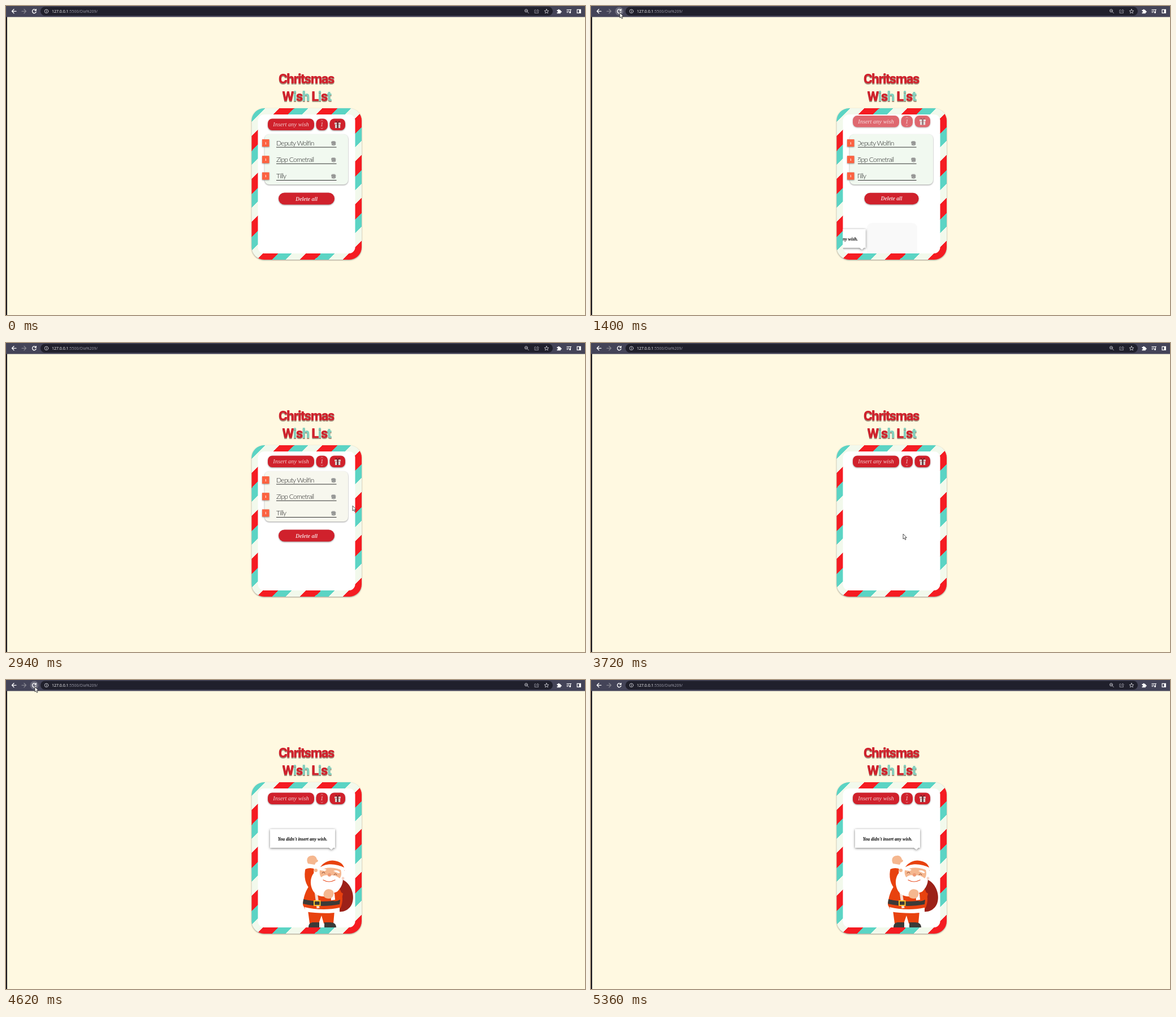
An HTML page for the animation above (5380 ms loop, 1024x547 px).

```html
<!DOCTYPE html>
<html lang="en">
<head>
<meta charset="utf-8">
<title>Wish list</title>
<style>
html, body { margin: 0; width: 100%; height: 100%; overflow: hidden; background: #fff9e1; }
svg { display: block; width: 1024px; height: 547px; }
.sh { filter: drop-shadow(0 1px 1px #0006); }
.url { font: 7px "Open Sans", sans-serif; fill: #9a9aa6; }
.title { font: 900 24px Roboto, sans-serif; letter-spacing: -1.5px; text-anchor: middle; fill: #d0212c; filter: drop-shadow(0 2px .5px #6b4a3a99); }
.title .alt { fill: #83d0be; }
.script { font: italic 10.4px "Liberation Serif", serif; text-anchor: middle; fill: #f3ced0; }
.bold { font-weight: 700; font-size: 10px; }
.wish { font: 300 12px Lato, sans-serif; letter-spacing: -.7px; fill: #222; }
.qty { font: 700 6px "Liberation Serif", serif; text-anchor: middle; fill: #fff; }
.red { fill: #d0212c; }
.coat { fill: #e8420f; }
.fur { fill: #fff; }
.skin { fill: #f5b78f; }
.dark { fill: #3b3a38; }
.line { fill: none; stroke-linecap: round; stroke-linejoin: round; }

/* every animation shares one clock */
.form, .slide, .pop, .bubble, .list, .panel, .remove, .note, .santa, .slot, .halo, .mouse, .arrow, .hand {
  animation: 5380ms linear infinite;
}
.list, .remove, .note, .slot, .halo, .arrow, .hand { animation-timing-function: step-end; }
.form { --y: -17px; --fade: 0; animation-name: enter; }
.slide { --x: -28px; animation-name: enter; }
.pop { --size: .91; transform-box: fill-box; transform-origin: center; animation-name: enter; }
.bubble { animation-name: bubble; }
.list { animation-name: list; }
.panel { animation-name: panel; animation-timing-function: step-end; }
.remove { animation-name: remove; }
.note { animation-name: note; }
.santa { animation-name: santa; }
.slot { animation-name: slot; }
.halo { animation-name: halo; }
.mouse { animation-name: mouse; }
.arrow { animation-name: arrow; }
.hand { animation-name: hand; }

@keyframes enter {
  0%, 21.18%, 32.34%, 43.48%, 54.65%, 87.35%, 98.51%, 100% { opacity: 1; transform: none; }
  21.19%, 43.49%, 87.36% {
    opacity: var(--fade, 1);
    transform: translate(var(--x, 0px), var(--y, 0px)) scale(var(--size, 1));
    animation-timing-function: cubic-bezier(.5, 1, .89, 1);
  }
}
@keyframes bubble {
  0%, 21.18%, 32.34%, 43.48%, 54.65%, 67.46%, 78.63%, 87.35%, 98.51%, 100% { transform: none; }
  21.19%, 43.49%, 67.47%, 87.36% {
    transform: translateX(-300px);
    animation-timing-function: cubic-bezier(.5, 1, .89, 1);
  }
}
@keyframes list {
  0%, 44.61% { visibility: visible; }
  43.49%, 67.29%, 100% { visibility: hidden; }
}
@keyframes panel {
  0% { fill: #f1f9f0; }
  44.61%, 100% { fill: #f7f7ee; }
}
@keyframes remove {
  0%, 44.61% { visibility: visible; translate: 0 0; }
  43.49%, 67.29% { visibility: hidden; translate: 0 0; }
  88.2% { visibility: visible; translate: 0 -95.5px; }
  91.27%, 100% { visibility: hidden; translate: 0 -95.5px; }
}
@keyframes note {
  0%, 27.7%, 50% { visibility: hidden; translate: 0 131px; }
  21.19%, 43.49% { visibility: visible; translate: 0 131px; }
  67.47%, 91.27%, 100% { visibility: visible; translate: 0 0; }
  87.36% { visibility: visible; translate: 0 36px; }
}
@keyframes santa {
  0%, 70.9%, 87.36%, 91.26% { transform: translateY(130px); }
  70.91%, 91.27% { transform: translateY(130px); animation-timing-function: cubic-bezier(.5, 1, .89, 1); }
  79.09%, 87.35%, 99.44%, 100% { transform: none; }
}
@keyframes slot {
  0%, 54.65%, 100% { visibility: hidden; }
  22.3% { visibility: visible; }
}
@keyframes halo {
  0%, 46.84%, 91.45%, 100% { visibility: hidden; }
  13.01%, 83.27% { visibility: visible; }
}
@keyframes mouse {
  0%, 1.86% { transform: translate(1030px, 139px); }
  11.52% { transform: translate(112px, 18px); }
  13.01%, 46.84% { transform: translate(51px, 12px); }
  53.16% { transform: translate(604px, 283px); }
  54.65% { transform: translate(613px, 288px); }
  58.5% { transform: translate(614px, 306px); }
  63.2% { transform: translate(563px, 322px); }
  65%, 72.5% { transform: translate(552px, 338px); }
  76.58% { transform: translate(554px, 266px); }
  83.27% { transform: translate(60px, 19px); }
  84%, 88.48% { transform: translate(51px, 12px); }
  91.08% { transform: translate(551px, 205px); }
  93.31% { transform: translate(823px, 109px); }
  95.17%, 100% { transform: translate(1030px, 36px); }
}
@keyframes arrow {
  0%, 91.8%, 100% { visibility: visible; }
  90.7% { visibility: hidden; }
}
@keyframes hand {
  0%, 91.8%, 100% { visibility: hidden; }
  90.7% { visibility: visible; }
}
</style>
</head>
<body>
<svg viewBox="0 0 1024 547">
  <defs>
    <linearGradient id="stripes" gradientUnits="userSpaceOnUse" x1="434" y1="181" x2="472" y2="219" spreadMethod="repeat">
      <stop offset="0" stop-color="#5bd4c4"/><stop offset=".316" stop-color="#5bd4c4"/>
      <stop offset=".316" stop-color="#f2f9ec"/><stop offset=".65" stop-color="#f2f9ec"/>
      <stop offset=".65" stop-color="#f51c22"/><stop offset="1" stop-color="#f51c22"/>
    </linearGradient>
    <clipPath id="paper"><rect x="445.5" y="192" width="172" height="246" rx="11"/></clipPath>
    <clipPath id="text"><rect x="472" y="227" width="132" height="90"/></clipPath>
    <g id="badge">
      <rect class="sh" x="453" y="236" width="12.5" height="13" fill="#fc6241"/>
      <text class="qty" x="459.2" y="244.6">1</text>
    </g>
    <g id="entry">
      <path d="M478 250H584.5" stroke="#333"/>
      <path d="M575 240.5L577 239H581.5L583.5 241L583 246L580 247.5L576 246.5Z" fill="#a9aaa8"/>
      <path class="line" d="M576 242L579 241L582 242M577 245L580 243.5L582.5 245" stroke="#6e706f" stroke-width=".8"/>
    </g>
  </defs>

  <rect width="1024" height="547" fill="#fff9e1"/>
  <rect y="19" width="2" height="528" fill="#17161c"/>

  <!-- browser bar -->
  <rect width="1024" height="19.5" fill="#444458"/>
  <rect x="61" y="1.5" width="906" height="15.5" rx="7.7" fill="#20202c"/>
  <circle class="halo" cx="50" cy="9.3" r="7.5" fill="#686879"/>
  <g class="line" stroke="#fff" stroke-width="1.3">
    <path d="M18 9.3H10.5M14 5.8L10.5 9.3L14 12.8"/>
    <path d="M28 9.3H35.5M32 5.8L35.5 9.3L32 12.8" stroke="#85858f"/>
    <path d="M52.6 7.2A3.4 3.4 0 1 0 53.2 10.3M53.3 5.6V8.1H50.8"/>
  </g>
  <g class="line" stroke="#c9c9d0" stroke-width=".9">
    <circle cx="71.5" cy="9.3" r="3.3"/><path d="M71.5 9V11M71.5 7.4V7.6"/>
    <circle cx="920" cy="8.3" r="2.5"/><path d="M922 10.3L924.3 12.6M918.9 8.3H921.1"/>
    <path d="M937 7H935V12.5H941.5V11M937 10.5C937.5 8.5 939 7.8 940 7.8V6L942.6 8.4L940 10.6V9.2" stroke="#9595a0"/>
    <path d="M956 5.6L957.1 8.2L959.8 8.4L957.7 10.2L958.4 12.8L956 11.4L953.6 12.8L954.3 10.2L952.2 8.4L954.9 8.2Z"/>
  </g>
  <g fill="#fff">
    <path d="M974.5 7H976.3A1.3 1.3 0 1 1 978.9 7H980.8V9A1.3 1.3 0 1 1 980.8 11.4V13.2H974.5V11.3A1.2 1.2 0 1 0 974.5 9Z"/>
    <path d="M991.5 6H998V7H991.5ZM991.5 8.4H996.5V9.4H991.5ZM991.5 10.8H994.8V11.8H991.5ZM998 6H1000V7H999V11.3A1.5 1.5 0 1 1 998 10Z"/>
    <path d="M1009.5 5.8H1017V13H1009.5ZM1010.7 7V11.8H1013.5V7Z" fill-rule="evenodd"/>
  </g>
  <text class="url" x="81" y="11.8"><tspan fill="#fff">127.0.0.1</tspan>:5500/Dia%209/</text>

  <text class="title" x="531" y="137">Chritsmas</text>
  <text class="title" x="531.5" y="168">W<tspan class="alt">i</tspan>s<tspan class="alt">h</tspan> L<tspan class="alt">i</tspan>s<tspan class="alt">t</tspan></text>

  <!-- letter -->
  <rect class="sh" x="434.5" y="181" width="194.5" height="268" rx="22" fill="url(#stripes)"/>
  <rect x="445.5" y="192" width="172" height="246" rx="11" fill="#fff"/>

  <g clip-path="url(#paper)">
    <path class="slot" d="M488 438V394Q488 384 498 384H567Q577 384 577 394V438Z" fill="#f9f9f9"/>

    <g class="form">
      <g class="sh red">
        <rect x="463" y="199.5" width="82" height="20.5" rx="8"/>
        <rect x="548.5" y="199.5" width="20.5" height="20.5" rx="8"/>
        <rect x="572.5" y="199.5" width="27.5" height="20.5" rx="8"/>
      </g>
      <text class="script" x="504" y="213.3">Insert any wish</text>
      <text class="script" x="558.7" y="213">1</text>
      <path class="line" d="M557 203.5L558.7 202L560.4 203.5M557 216L558.7 217.5L560.4 216" stroke="#e9a9ad" stroke-width=".8"/>
      <path d="M581 206.5H592V209.5H581ZM582 210H591.2V216H582Z" fill="#d9d4d0"/>
      <path d="M585.4 206H587.8V216H585.4ZM586.6 206L582 204.5L584 203.3ZM586.6 206L591 204.5L589 203.3Z" fill="#54262b"/>
    </g>

    <g class="list">
      <rect class="panel sh" x="457.5" y="227" width="147.5" height="89" rx="8"/>
      <use href="#badge"/><use href="#badge" y="29.2"/><use href="#badge" y="58.5"/>
      <g clip-path="url(#text)">
        <g class="slide">
          <use href="#entry"/><use href="#entry" y="29.2"/><use href="#entry" y="58.5"/>
          <text class="wish" x="478" y="246.5">Deputy Wolfin</text>
          <text class="wish" x="478" y="275.7">Zipp Cometrail</text>
          <text class="wish" x="478" y="305">Tilly</text>
        </g>
      </g>
    </g>

    <g class="remove">
      <g class="pop">
        <rect class="sh red" x="482" y="330.5" width="99" height="21" rx="10.5"/>
        <text class="script bold" x="531.5" y="344.6">Delete all</text>
      </g>
    </g>

    <g class="santa">
      <path d="M581 360C586 350 594 351 601 357C612 366 617 383 612 396C607 408 594 413 583 409L572 380Z" fill="#9c2118"/>
      <path class="coat" d="M534 408H581L579 431H562L558 417L553 431H537Z"/>
      <path class="dark" d="M535 438C535 431 539 429 544 429H554V438ZM563 438V429H573C580 429 584 432 584 438Z"/>
      <path class="coat" d="M538 362C530 372 526 384 525 398L529 406C548 412 572 411 591 405C597 392 596 380 590 370Z"/>
      <path class="fur" d="M528 402C548 407 572 407 590 403L590 411C572 414 548 413 530 410Z"/>
      <path d="M548 374L552 404" stroke="#f6ddd2" stroke-width="5"/>
      <path class="dark" d="M526 388C546 393 570 393 591 389L590 397C570 401 546 401 525 396Z"/>
      <rect x="545" y="391" width="10.5" height="8" fill="none" stroke="#f4bd2b" stroke-width="2"/>
      <path class="coat" d="M530 332C526 348 529 362 540 373L554 356C545 350 543 342 545 333Z"/>
      <path class="fur" d="M528 328Q538 323 549 329L547 335Q538 331 529 335Z"/>
      <path class="skin" d="M534 325C530 317 534 311 541 311C545 310 549 313 550 318C554 319 551 323 548 323L546 327Z"/>
      <path class="fur" d="M546 340C536 350 537 368 547 378C558 388 580 383 589 371C598 360 597 349 592 342L572 332Z"/>
      <path class="coat" d="M556 331C563 321 575 317 586 321C595 324 599 330 599 338L591 333Z"/>
      <path class="skin" d="M556 334C568 327 584 330 592 336C594 343 593 349 589 352L573 348L558 350C554 345 554 339 556 334Z"/>
      <circle class="skin" cx="548" cy="337" r="3"/>
      <path class="fur" d="M553 334C563 324 583 324 600 333L598 339C584 331 567 330 556 337Z"/>
      <path class="fur" d="M556 337Q561 332 567 336L564 338ZM579 338Q586 335 591 341L588 342ZM571 347C565 343 557 348 554 354C562 358 569 355 572 351C577 356 585 356 591 352C586 347 577 344 571 347Z"/>
      <circle cx="572" cy="345" r="3" fill="#ee9a77"/>
      <path class="line" d="M559 342Q561.5 338 564 342M580 345Q582.5 341 585 345" stroke="#7a3a28"/>
      <path class="line" d="M561 354Q571 360 582 354" stroke="#e8542a" stroke-width="1.2"/>
      <circle cx="596" cy="351" r="2.4" fill="#f7d5c8"/>
      <path class="coat" d="M575 382C580 374 590 373 596 378C595 387 588 393 578 391Z"/>
      <path class="fur" d="M574 374L581 378L582 389L575 390Z"/>
      <path class="skin" d="M562 377C564 370 572 368 578 373C582 379 578 387 571 387C564 387 560 383 562 377Z"/>
    </g>

    <g class="note">
      <g class="bubble">
        <path d="M467 264H582V297H579L575.5 300.5L571 297H467Z" fill="#fff" style="filter:drop-shadow(0 1px 2px #0008)"/>
        <text class="script bold" x="524.5" y="284" style="font-size:8px;fill:#222;filter:drop-shadow(0 1px .5px #0006)">You didn't insert any wish.</text>
      </g>
    </g>
  </g>

  <g class="mouse" fill="#fff" stroke="#222" stroke-width=".8" stroke-linejoin="round">
    <path class="arrow" d="M0 0V9L2 7.2L3.5 10.4L5 9.7L3.6 6.6H6.3Z"/>
    <path class="hand" d="M-1 1Q0 -.8 1 1V4.4L5 5.2Q6.4 5.6 6.2 7.2L5.4 11.6H0L-3 7.6Q-3.2 6 -1 7.2Z"/>
  </g>
</svg>
</body>
</html>
```
